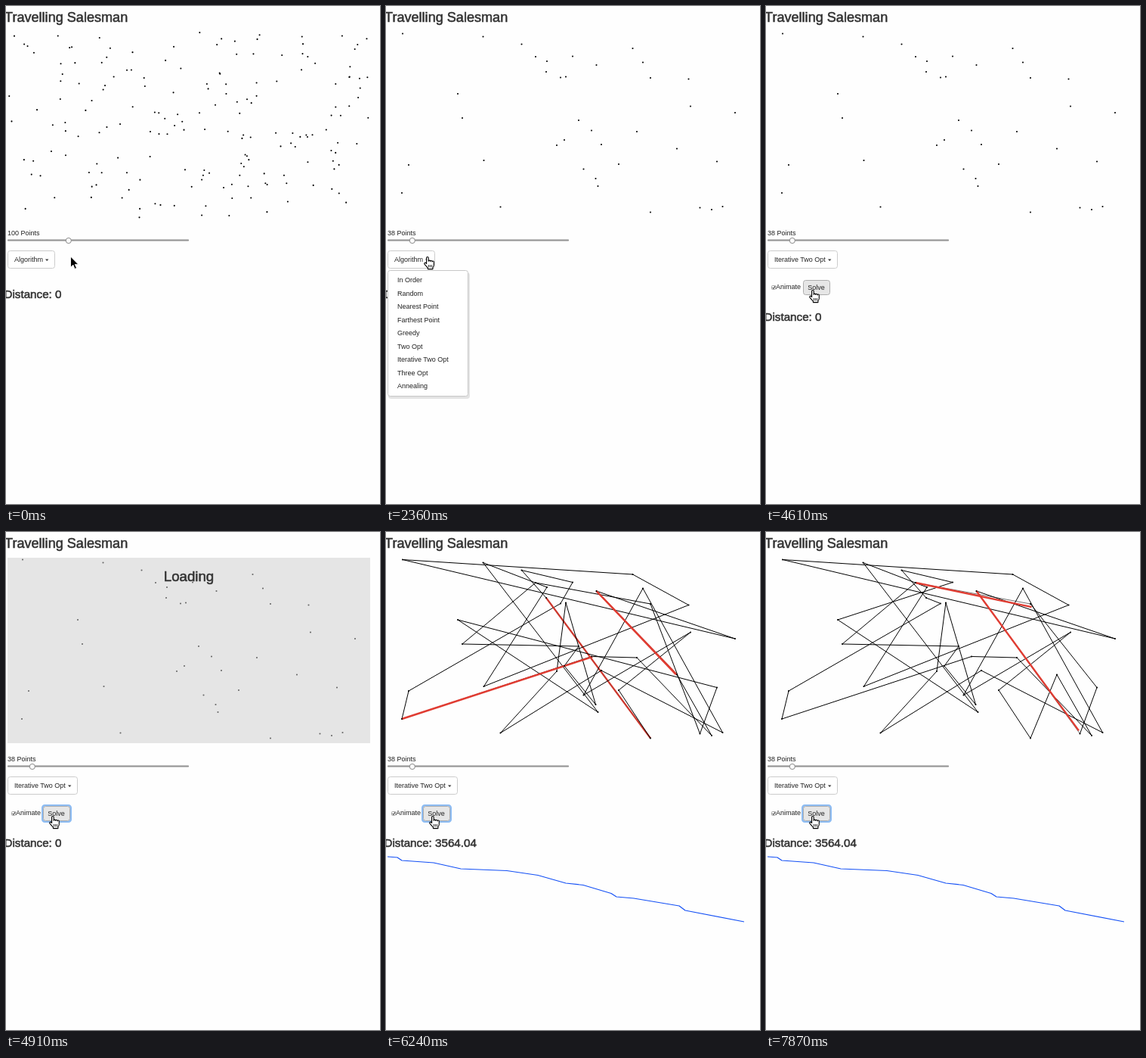
These frames come from a looping animation (495 px wide and 658 px high, 8000 ms). An HTML page with a canvas:

```html
<!DOCTYPE html>
<html lang="en">
<head>
<meta charset="utf-8">
<title>Travelling Salesman</title>
<style>
html, body { margin: 0; width: 100%; height: 100%; overflow: hidden; background: #fefefe; }
canvas, svg { position: absolute; left: 0; top: 0; width: 495px; height: 658px; }
text { font: 9px "Liberation Sans", Arial, sans-serif; fill: #222; white-space: pre; }
.head { fill: #333; stroke: #333; stroke-width: .55px; }
.btn { fill: #fff; stroke: #ccc; }
</style>
</head>
<body>
<canvas id="map"></canvas>
<svg viewBox="0 0 495 658">
  <text class="head" x="-2" y="21" style="font-size:18.1px">Travelling Salesman</text>

  <g id="loading">
    <rect x="2" y="34" width="480" height="245" fill="#cdcdcd" opacity=".5"/>
    <text class="head" x="242" y="65" text-anchor="middle" style="font-size:18.7px">Loading</text>
  </g>

  <text id="count" x="2" y="303"></text>
  <rect x="2" y="308" width="240" height="3" rx="1" fill="#c2c2c2"/>
  <rect x="2" y="309" width="240" height="1" fill="#949494"/>
  <circle id="knob" cy="310" r="3.6" fill="#fafafa" stroke="#8a8a8a"/>

  <rect id="pick" class="btn" x="2.5" y="323.5" height="23" rx="3"/>
  <text id="algo" x="11" y="338.3"></text>
  <path id="caret" d="M0 334.6h4.4l-2.2 2.4z" fill="#333"/>

  <g id="run">
    <rect x="7.5" y="369.5" width="5" height="5" rx="1" fill="#f2f2f2" stroke="#999" stroke-width=".8"/>
    <path d="M8.5 372l1.4 1.6 2.4-3.8" fill="none" stroke="#333"/>
    <text x="13" y="374">Animate</text>
    <rect id="ring" x="48.3" y="361.3" width="37.4" height="21.4" rx="3" fill="none" stroke="#8dbcf3" stroke-width="2.6"/>
    <rect id="solve" class="btn" x="49.5" y="362.5" width="35" height="19" rx="3"/>
    <text x="55.3" y="375.2">Solve</text>
  </g>

  <text id="dist" class="head" x="-2.5" style="font-size:15.2px"></text>
  <polyline id="chart" fill="none" stroke="#1450f5" stroke-width="1.2" stroke-linejoin="round"
    points="2,429 15,430 21,434 63,437 99,445 160,447.5 201,453.5 238,464 261,466.5 298,477.5 305,482 328,484 388,494 396,500 474,515"/>

  <g id="menu">
    <rect x="3" y="352" width="108" height="167" rx="4" opacity=".1"/>
    <rect x="2.5" y="349.5" width="106" height="166" rx="3" fill="#fff" stroke="#c8c8c8"/>
    <rect id="hover" x="3" width="105" height="17.5" fill="#f5f5f5"/>
  </g>

  <g id="cursor">
    <path id="arrow" d="M.5 0V14.2L3.9 11.2 6 16.4 8.5 15.3 6.3 10.4H10.8z" stroke="#fff" stroke-width=".9"/>
    <g id="hand" fill="#fff" stroke="#000" stroke-width="1.1" stroke-linejoin="round">
      <path d="M3.6 1.8a1.3 1.3 0 0 1 2.6 0V6.2a1.2 1.2 0 0 1 2.4.2 1.2 1.2 0 0 1 2.4.5 1.1 1.1 0 0 1 2.3.6V11q0 2-1.4 3.4V16.6H5.4V15.2Q3 12.6 1 10.2a1.2 1.2 0 0 1 1.9-1.5l.7.8z"/>
      <path d="M6.4 11v3.4M8.4 11v3.4M10.4 11v3.4" stroke-width=".8"/>
    </g>
  </g>
</svg>
<script>
const LOOP = 8000, TICK = 148.5;
const $ = id => document.getElementById(id);
const show = (id, on) => { $(id).style.display = on ? '' : 'none'; };
const clamp = v => Math.max(0, Math.min(1, v));
const mix = (a, b, p) => a + (b - a) * p;

// Large cloud, scattered at random over the map
let seed = 71;
const rand = () => (seed = (seed * 16807) % 2147483647) / 2147483647;
const cloud = Array.from({ length: 178 }, () => [4 + rand() * 476, 35 + rand() * 248]);

// Small set, in the order of the first tour
const cities = [
  [22, 36.5], [462, 141], [278.5, 78], [231, 94.5], [30, 210], [21, 247], [385, 188.5], [431, 269],
  [332, 166], [272, 164.5], [247, 66.5], [179.5, 50.5], [212, 87], [350, 272.5], [308, 209],
  [403, 132.5], [261.5, 215.5], [340, 74.5], [445.5, 265], [285, 183], [151.5, 265.5], [226, 184],
  [238, 93.5], [277.5, 228], [236, 177], [255, 151], [101, 148], [198, 67], [350, 95], [415.5, 266.5],
  [438, 205.5], [95, 116], [280.5, 238], [128.5, 40.5], [213, 73], [129.5, 204], [400.5, 96.5], [326.5, 56]
];

// Each two-opt move reverses tour[3..end]; the later moves run faster
const ends = [9, 6, 12, 5, 30, 4, 5];
const startOf = i => i < 3 ? 5408 + 447 * i : 6800 + 336.5 * (i - 3);
const tours = [cities];
ends.forEach((e, i) => {
  const t = tours[i];
  tours.push([...t.slice(0, 3), ...t.slice(3, e + 1).reverse(), ...t.slice(e + 1)]);
});

['In Order', 'Random', 'Nearest Point', 'Farthest Point', 'Greedy', 'Two Opt',
 'Iterative Two Opt', 'Three Opt', 'Annealing'].forEach((name, i) => {
  const el = document.createElementNS('http://www.w3.org/2000/svg', 'text');
  el.setAttribute('x', 15);
  el.setAttribute('y', 365 + i * 17.5);
  el.textContent = name;
  $('menu').append(el);
});

const canvas = $('map'), ctx = canvas.getContext('2d');
const dpr = window.devicePixelRatio || 1;
canvas.width = 495 * dpr;
canvas.height = 658 * dpr;
ctx.scale(dpr, dpr);

function line(a, b, color, width, alpha) {
  ctx.globalAlpha = alpha;
  ctx.strokeStyle = color;
  ctx.lineWidth = width;
  ctx.beginPath();
  ctx.moveTo(...a);
  ctx.lineTo(...b);
  ctx.stroke();
  ctx.globalAlpha = 1;
}

function dots(list) {
  ctx.fillStyle = '#000';
  for (const [x, y] of list) {
    ctx.beginPath();
    ctx.arc(x, y, 1.05, 0, 7);
    ctx.fill();
  }
}

function drawTour(time) {
  let n = 0;
  while (n < ends.length - 1 && time >= startOf(n + 1)) n++;
  const p = clamp((time - startOf(n)) / (startOf(n + 1) - startOf(n)));
  const ease = p < .5 ? 4 * p ** 3 : 1 - 4 * (1 - p) ** 3;
  const old = tours[n], now = tours[n + 1], e = ends[n], next = ends[n + 1];
  const tint = clamp((p - .4) * 2);

  // New edges fade in, and the pair to be moved next turns red
  now.forEach((a, i) => {
    const hot = next && (i === 2 || i === next) ? tint : 0;
    const alpha = i === 2 || i === e ? clamp((p - .3) * 5) : 1;
    const color = `rgb(${224 * hot},${60 * hot},${50 * hot})`;
    line(a, now[(i + 1) % now.length], color, 1 + 1.5 * hot ** 3, alpha);
  });
  for (const i of [2, e]) line(old[i], old[i + 1], '#000', 1, clamp(1 - 2.5 * p));

  if (time >= startOf(0)) {
    const slide = (a, b) => [mix(a[0], b[0], ease), mix(a[1], b[1], ease)];
    line(old[2], slide(old[3], old[e]), '#e03c32', 2.4, 1);
    line(old[e + 1], slide(old[e], old[3]), '#e03c32', 2.4, 1);
  }
}

// Cursor moves: first tick, last tick, end point
const moves = [[1, 9, 32, 308], [11, 15, 50, 331], [17, 23, 41, 459], [26, 31, 57, 375]];

function cursorAt(k) {
  let at = [85, 331];
  for (const [from, to, x, y] of moves) {
    const p = clamp((k - from) / (to - from));
    at = [mix(at[0], x, p), mix(at[1], y, p)];
  }
  return at;
}

function render(t) {
  const k = Math.floor((t + 17) / TICK);
  const few = k >= 11, chosen = k >= 25, over = k >= 31, pressed = k >= 33, solved = k >= 36;

  ctx.clearRect(0, 0, 495, 658);
  if (solved) drawTour(k * TICK);
  dots(few ? cities : cloud);

  show('loading', pressed && !solved);
  $('count').textContent = (few ? 38 : 100) + ' Points';
  $('knob').setAttribute('cx', few ? 34.8 : 82.8);
  $('pick').setAttribute('width', chosen ? 92 : 62);
  $('algo').textContent = chosen ? 'Iterative Two Opt' : 'Algorithm';
  $('caret').setAttribute('transform', `translate(${chosen ? 82 : 52})`);

  show('run', chosen);
  show('ring', pressed);
  $('solve').style.fill = over ? '#e6e6e6' : '';
  $('solve').style.stroke = over ? '#adadad' : '';

  $('dist').setAttribute('y', chosen ? 416 : 386);
  $('dist').textContent = 'Distance: ' + (solved ? '3564.04' : '0');
  show('chart', solved);

  const [x, y] = cursorAt(k);
  const row = Math.floor((y - 353) / 17.5);
  show('menu', k >= 16 && !chosen);
  show('hover', row >= 0);
  $('hover').setAttribute('y', 353 + Math.max(row, 0) * 17.5);

  const hand = over || (k >= 15 && k < 27);
  show('hand', hand);
  show('arrow', !hand);
  $('cursor').setAttribute('transform', `translate(${x} ${y})`);
}

const begin = performance.now();
function loop() {
  render((performance.now() - begin) % LOOP);
  requestAnimationFrame(loop);
}
loop();
</script>
</body>
</html>
```
